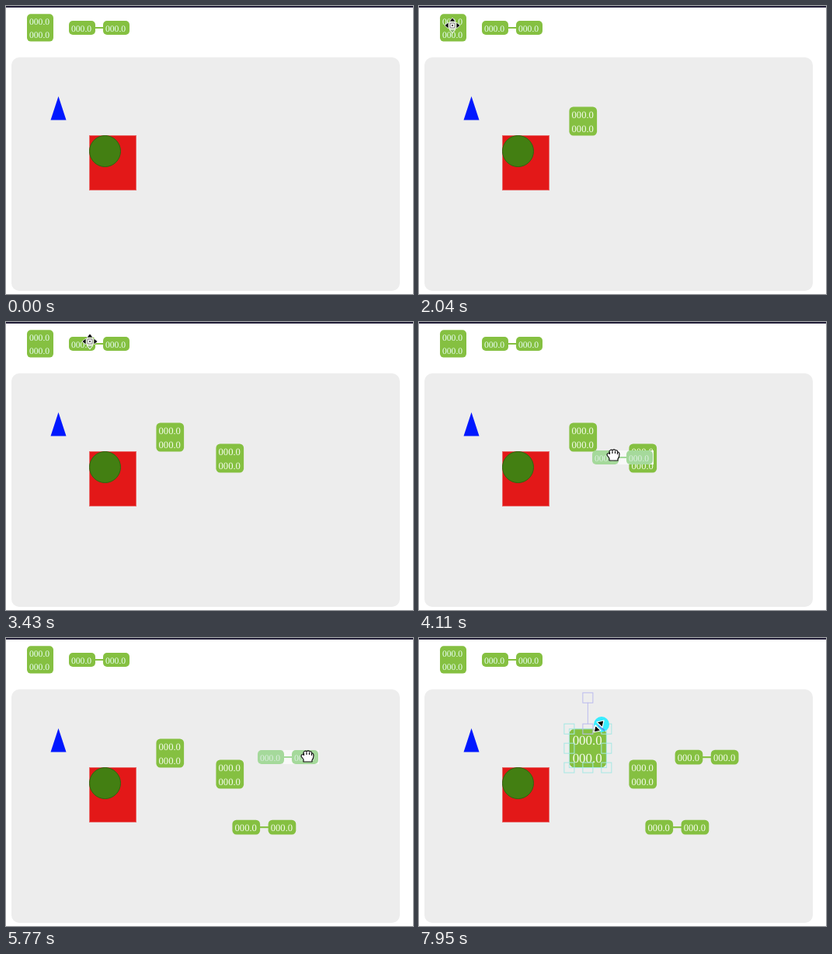
These frames come from a looping animation (524x370 px, 7.99 s). An HTML page:

```html
<!DOCTYPE html>
<html lang="en">
<head>
<meta charset="utf-8">
<title>Shape editor</title>
<style>
html, body { margin: 0; width: 100%; height: 100%; overflow: hidden; background: #fff; }
svg { display: block; width: 524px; height: 370px; }
.item { color: #85c041; fill: #f6fcee; font: 12px "Liberation Serif", serif; text-rendering: geometricPrecision; }
.palette { fill: #eafff6; font-size: 11.6px; }
.ghost { color: #a5d99b; fill: #dcefe0; font-size: 11.6px; }
.handles { fill: none; stroke: #a6e8e4; }
.handles .top { stroke: #bcbcee; }
</style>
</head>
<body>
<svg viewBox="0 0 524 370">
  <defs>
    <g id="block">
      <rect width="34" height="35.3" rx="5" fill="currentColor"/>
      <text x="3" y="14.1">000.0</text>
      <text x="3" y="30.9">000.0</text>
    </g>
    <g id="pill">
      <rect width="34" height="18" rx="5" fill="currentColor"/>
      <text x="3" y="14">000.0</text>
    </g>
    <g id="link">
      <path d="M33 9H45" stroke="currentColor" stroke-width="2"/>
      <use href="#pill"/>
      <use href="#pill" x="44"/>
    </g>
  </defs>

  <rect width="524" height="2" fill="#25213a"/>
  <use href="#block" class="item palette" x="27" y="10.3"/>
  <use href="#link" class="item palette" x="81" y="19"/>
  <rect x="7" y="66" width="500" height="300" rx="10" fill="#ededed"/>
  <path d="M67.5 116L77.5 146.5H57.5Z" fill="#0018ff"/>
  <rect x="107.5" y="166.500" width="60" height="70" fill="#e31818" stroke="#e86a6a"/>
  <circle cx="127.5" cy="186.5" r="20" fill="#437f12" stroke="#30640e"/>

  <g id="items"></g>
  <g id="handles" class="handles"></g>

  <g id="ghost">
    <rect id="patch" x="33" width="46" height="18" fill="#f8f8f8"/>
    <use id="ghostShape" class="item ghost"/>
  </g>

  <g id="cursor" stroke-linejoin="round">
    <path data-mode="arrow" d="M0 0V15L3.5 11.8L6 17.5L8.5 16.4L6 11H11Z" fill="#000" stroke="#fff"/>
    <g data-mode="move">
      <path d="M-3 -3H3V3H-3Z" fill="#fff" stroke="#fff" stroke-width="3"/>
      <path d="M-3 -3H3V3H-3Z" fill="none" stroke="#777"/>
      <path d="M-1 -1H1V1H-1Z" fill="#555"/>
      <path d="M0 -10L4 -5H-4ZM-10 0L-5 -4V4ZM10 0L5 -4V4Z" fill="#000" stroke="#fff" stroke-width=".8"/>
      <path d="M0 10L4 5H-4Z" fill="#8db873" stroke="#fff"/>
    </g>
    <path data-mode="hand" d="M-5 7V4L-8 0Q-8 -3 -5 -2L-5 -5Q-3 -8 -1 -6Q1 -8 3 -6Q5 -7 6 -4Q8 -4 8 -1Q8 3 6 5V7ZM-4.5 -4V-1M-1 -5V-2M2.5 -5V-2M5.5 -4V-1" fill="#fff" stroke="#111" stroke-width="1.2"/>
    <g data-mode="resize">
      <circle r="10" fill="#38ecff"/>
      <path d="M-4 1L4 8" stroke="#5a8cf0" stroke-width="2"/>
      <path d="M-10 10L-8 1L-1 8ZM3 -5L1 4L-6 -3Z" fill="#000" stroke="#fff" stroke-width="1.2"/>
    </g>
  </g>
</svg>

<script>
const LOOP = 7990, BASE = 1.05, SELECT = 6880, RESIZE = 7500;
const $ = id => document.getElementById(id);

const kinds = {
  block: { x: 27, y: 10, w: 34, h: 35.3 },
  link: { x: 81, y: 19, w: 78, h: 18 }
};

// Pointer gestures; a drag carries a palette item and drops it when the next gesture begins
const gestures = [
  { at: 460, end: 900, to: [209, 144], drag: 'block', drop: [193.4, 129.5] },
  { at: 1210, end: 2000, to: [43, 25] },
  { at: 2040, end: 2680, to: [281, 163], drag: 'block', drop: [270.4, 156.5] },
  { at: 2870, end: 3430, to: [108, 25] },
  { at: 3790, end: 4300, to: [314, 237], drag: 'link', drop: [291.4, 233.7] },
  { at: 4300, end: 4580, to: [320, 241] },
  { at: 4620, end: 4880, to: [163, 23] },
  { at: 4880, end: 5080, to: [145, 27] },
  { at: 5330, end: 5770, to: [388, 152], drag: 'link', drop: [329.6, 143.7] },
  { at: 5820, end: 6100, to: [396, 161] },
  { at: 6140, end: 6840, to: [212, 148] },
  { at: 6960, end: 7360, to: [233, 131] },
  { at: RESIZE, end: 7950, to: [235, 111] }
];

function make(parent, tag, attrs) {
  const el = document.createElementNS('http://www.w3.org/2000/svg', tag);
  set(el, attrs);
  return parent.appendChild(el);
}

function set(el, attrs) {
  for (const k in attrs) el.setAttribute(k, attrs[k]);
}

const place = (el, x, y, s = 1) => set(el, { transform: `translate(${x} ${y}) scale(${s})` });
const show = (el, on) => { el.style.display = on ? '' : 'none'; };
const mix = (a, b, u) => a + (b - a) * u;
const ease = u => { u = Math.max(0, Math.min(1, u)); return u * u * (3 - 2 * u); };

gestures.forEach((g, i) => {
  g.start = i ? gestures[i - 1].to : [47, 28];
  if (!g.drag) return;
  g.release = gestures[i + 1].at + 40;
  g.el = make($('items'), 'use', { href: '#' + g.drag, class: 'item' });
  place(g.el, ...g.drop, BASE);
});
const drags = gestures.filter(g => g.drag);

const frame = make($('handles'), 'rect', {});
const stem = make($('handles'), 'path', { class: 'top' });
const grip = cls => make($('handles'), 'rect', { width: 13, height: 13, class: cls });
const grips = [];
for (let i = 0; i < 9; i++) if (i !== 4) grips.push({ i, el: grip(i === 1 ? 'top' : '') });
const knob = grip('top');

function pointer(t) {
  const g = gestures.findLast(g => t >= g.at) || gestures[0];
  const u = ease((t - g.at) / (g.end - g.at));
  return g.start.map((v, i) => mix(v, g.to[i], u));
}

// A drag becomes visible once the pointer has moved a little
const activeDrag = (t, x, y) => drags.find(g =>
  t >= g.at && t < g.release && Math.hypot(x - g.start[0], y - g.start[1]) > 8);

const moveGrip = (el, x, y) => set(el, { x: x - 6.5, y: y - 6.5 });

function drawHandles(x, y, width, height) {
  const mid = x + width / 2;
  set(frame, { x, y, width, height });
  for (const { i, el } of grips) moveGrip(el, x + width * (i % 3) / 2, y + height * Math.floor(i / 3) / 2);
  set(stem, { d: `M${mid} ${y - 34}V${y - 6}` });
  moveGrip(knob, mid, y - 40);
}

function cursorMode(t, x, y) {
  if (t >= RESIZE || t >= SELECT && Math.hypot(x - 230, y - 129) < 9) return 'resize';
  const over = (k, left, top, pad) =>
    x > left - pad && x < left + k.w + pad && y > top - pad && y < top + k.h + pad;
  const hit = Object.values(kinds).some(k => over(k, k.x, k.y, 5)) ||
    drags.some(g => t >= g.release && over(kinds[g.drag], ...g.drop, 3));
  return hit ? 'move' : 'arrow';
}

function draw() {
  const t = performance.now() % LOOP;
  const [x, y] = pointer(t);
  const drag = activeDrag(t, x, y);

  for (const g of drags) show(g.el, t >= g.release);

  // The first block grows from its lower left corner
  const { el, drop: [left, top], drag: kind } = drags[0];
  const { w, h } = kinds[kind];
  const scale = mix(BASE, 1.41, ease((t - RESIZE) / 450));
  const y0 = top + h * (BASE - scale);
  place(el, left, y0, scale);
  show($('handles'), t >= SELECT);
  drawHandles(left, y0, w * scale, h * scale);

  show($('ghost'), drag);
  if (drag) {
    const from = kinds[drag.drag];
    set($('ghostShape'), { href: '#' + drag.drag });
    show($('patch'), drag.drag === 'link');
    place($('ghost'), Math.round(x - drag.start[0] + from.x), Math.round(y - drag.start[1] + from.y));
  }

  show($('cursor'), drag || t >= drags[0].release);
  const mode = drag ? 'hand' : cursorMode(t, x, y);
  for (const c of $('cursor').children) show(c, c.dataset.mode === mode);
  place($('cursor'), Math.round(x), Math.round(y));
  requestAnimationFrame(draw);
}
draw();
</script>
</body>
</html>
```
